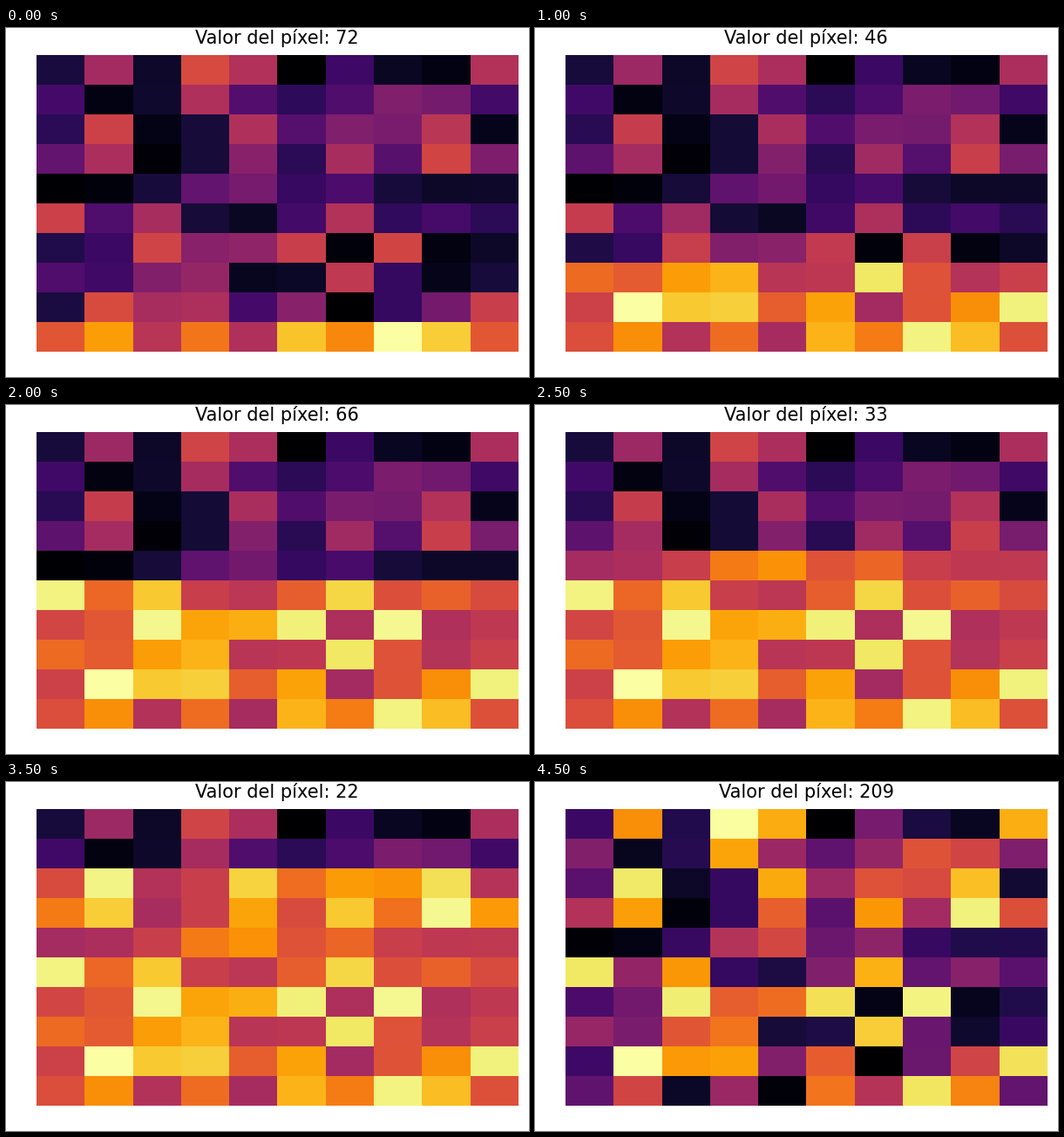
Recreate the animation shown at these times as a matplotlib script. Size 600 px wide and 400 px high, loop 5000 ms.

```python
import numpy as np
import matplotlib.pyplot as plt
from matplotlib.animation import FuncAnimation

W, H, DPI = 600, 400, 100
LEFT, RIGHT, TOP, BOTTOM = 35, 588, 31, 371
LIFT = 200

pixels = np.array([
    [47, 192, 33, 254, 208, 0, 84, 28, 15, 209],
    [91, 14, 35, 204, 107, 69, 103, 155, 143, 89],
    [66, 240, 18, 44, 207, 108, 154, 148, 218, 22],
    [122, 201, 5, 44, 164, 66, 197, 112, 245, 152],
    [2, 9, 45, 123, 145, 77, 99, 45, 32, 33],
    [239, 102, 197, 44, 29, 90, 210, 71, 94, 66],
    [56, 81, 243, 163, 172, 235, 10, 246, 13, 32],
    [104, 86, 157, 177, 25, 30, 225, 75, 20, 46],
    [49, 255, 198, 202, 91, 162, 0, 76, 142, 236],
    [70, 143, 17, 106, 4, 177, 124, 238, 186, 72],
])
ROWS = len(pixels)

fig = plt.figure(figsize=(W / DPI, H / DPI), dpi=DPI, facecolor="white")
ax = fig.add_axes([LEFT / W, 1 - BOTTOM / H,
                   (RIGHT - LEFT) / W, (BOTTOM - TOP) / H])
ax.axis("off")
image = ax.imshow(pixels, cmap="inferno", aspect="auto",
                  interpolation="nearest")
title = fig.text(311.3 / W, 1 - 18 / H, "", ha="center", va="baseline",
                 fontsize=15, family="DejaVu Sans", color="black")


def draw(step):
    # Rows are brightened one by one from the bottom; colours rescale to fit.
    row = ROWS - 1 - step
    grid = pixels.copy()
    grid[row:] += LIFT
    image.set_data(grid)
    image.set_clim(grid.min(), grid.max())
    title.set_text(f"Valor del píxel: {pixels[row, -1]}")
    return image, title


anim = FuncAnimation(fig, draw, frames=ROWS, interval=500,
                     init_func=lambda: draw(0), repeat=True, repeat_delay=0)
plt.show()
```
